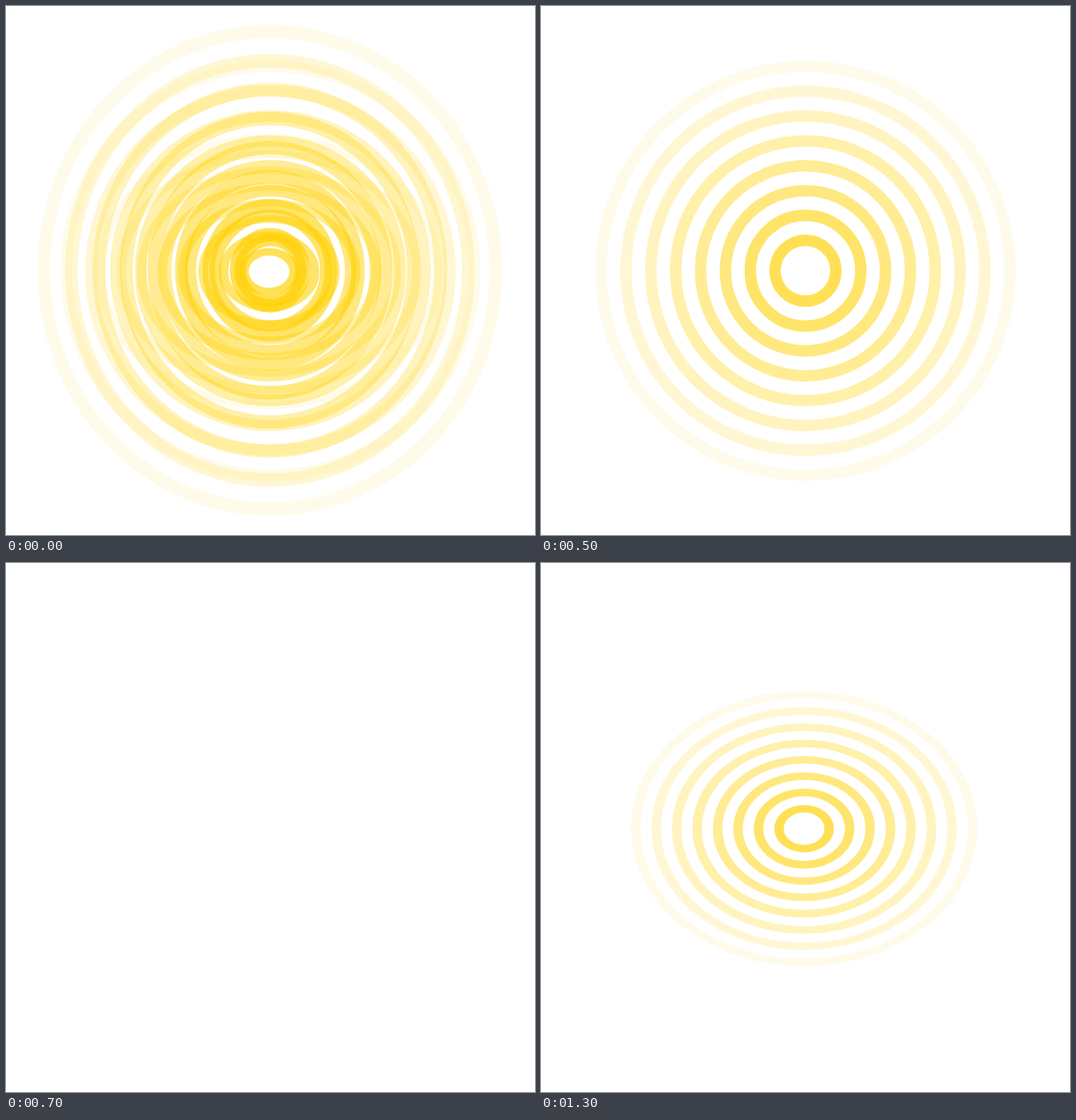
Animation, 600 px wide and 600 px high, one loop 1.4 s. Source, as an HTML page:

```html
<!DOCTYPE html>
<html lang="en">
<head>
<meta charset="utf-8">
<title>Pulsing rings</title>
<style>
  html, body { margin: 0; width: 100%; height: 100%; overflow: hidden; background: #fff; }
  svg { display: block; width: 100%; height: 100%; }
</style>
</head>
<body>
<svg id="stage" viewBox="0 0 600 600" fill="none" stroke="#ffd100" stroke-width="13"></svg>
<script>
const LOOP = 1400;
const RINGS = 8;
const stage = document.getElementById('stage');

function make(parent, tag, attrs) {
  const node = document.createElementNS('http://www.w3.org/2000/svg', tag);
  for (const key in attrs) node.setAttribute(key, attrs[key]);
  return parent.appendChild(node);
}

// One set of concentric rings, fading towards the outside.
function makeBurst(x, y, scaleX, scaleY) {
  const group = make(stage, 'g', {
    transform: `translate(${x} ${y}) scale(${scaleX} ${scaleY})`
  });
  for (let i = 0; i < RINGS; i++) {
    make(group, 'circle', {
      r: 34.5 + 28.2 * i,
      'stroke-opacity': 2 / 3 * (RINGS - i) / RINGS
    });
  }
  return group;
}

const bursts = {
  small: makeBurst(298.4, 301.3, 0.824, 0.655),
  medium: makeBurst(300, 300.3, 1, 1),
  large: makeBurst(299.3, 299.75, 1.105, 1.168)
};

// Start time of each pose and the bursts visible in it:
// a flash of all, then two runs that shrink from large to small.
const poses = [
  [0, ['small', 'medium', 'large']],
  [200, []],
  [300, ['large']],
  [500, ['medium']],
  [600, ['small']],
  [700, []],
  [1100, ['large']],
  [1200, ['medium']],
  [1300, ['small']]
];

function render(time) {
  const [, visible] = poses.filter(([start]) => start <= time).pop();
  for (const name in bursts) {
    bursts[name].style.display = visible.includes(name) ? '' : 'none';
  }
}

const begin = performance.now();
function tick() {
  render((performance.now() - begin) % LOOP);
  requestAnimationFrame(tick);
}
tick();
</script>
</body>
</html>
```
